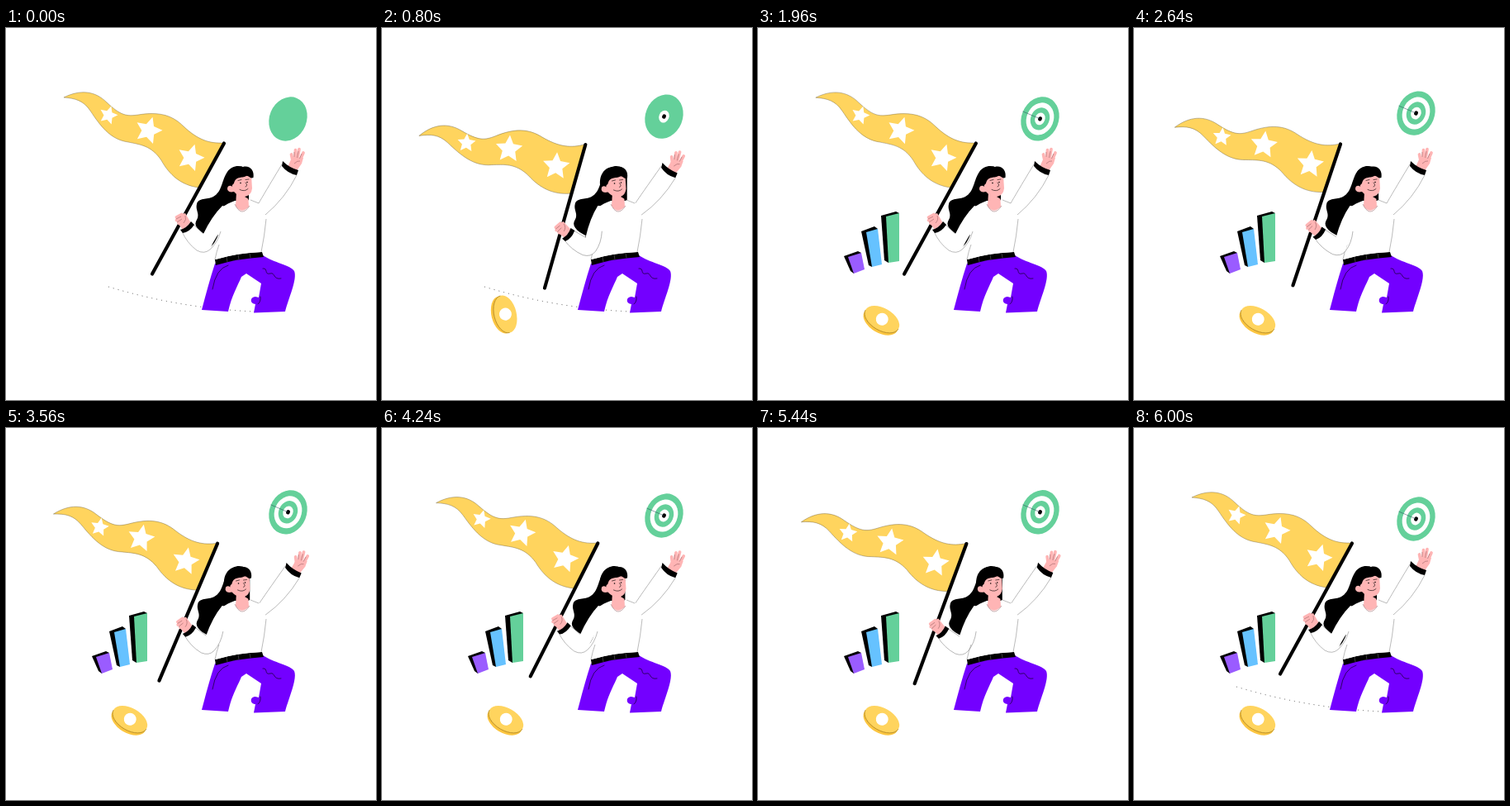
Animation of 448x450 px, one loop 6.04 s. Source, as an HTML page:

```html
<!DOCTYPE html>
<html lang="en">
<head>
<meta charset="utf-8">
<title>Flag bearer</title>
<style>
  html, body { margin: 0; width: 100%; height: 100%; overflow: hidden; background: #fff; }
  svg { display: block; width: 448px; height: 450px; }
  .thin { fill: none; stroke: #777; stroke-width: .5; }
  .ink { fill: none; stroke: #000; stroke-width: .6; stroke-linecap: round; }
  .skin { fill: #ffb5b5; }
  .fingers { fill: none; stroke: #ffb5b5; stroke-width: 3.7; stroke-linecap: round; }
  .crease { fill: none; stroke: #8a5558; stroke-width: .5; }
</style>
</head>
<body>
<svg viewBox="0 0 448 450">
  <path id="ground" d="M124 313Q210 339 300 343" fill="none" stroke="#333" stroke-width=".8" stroke-dasharray="1 5"/>

  <g id="bars"></g>

  <g id="coin">
    <ellipse cy="2" rx="23" ry="13.5" fill="#fbc540"/>
    <ellipse cy="-1.5" rx="23" ry="13.3" fill="#ffd45e"/>
    <path d="M-23 -1A23 13.3 0 0 0 23 -1" fill="none" stroke="#a98226" stroke-width=".7"/>
    <circle cy="-1.5" r="7.5" fill="#fff"/>
  </g>

  <g id="target">
    <g transform="rotate(22)">
      <ellipse rx="22.5" ry="27.3" fill="#64d09a"/>
      <ellipse class="ring" rx="16.3" ry="20" fill="#fff"/>
      <ellipse class="ring" rx="11.3" ry="14" fill="#64d09a"/>
      <ellipse class="ring" rx="6" ry="7.6" fill="#fff"/>
      <ellipse class="ring" rx="2.3" ry="2.7" fill="#000"/>
    </g>
    <path id="arrow" d="M0 0L-21 -9" fill="none" stroke="#245" stroke-width=".5" pathLength="1" stroke-dasharray="1"/>
  </g>

  <!-- hair -->
  <path id="hair" d="M294 176C290 165 275 164 268 174C261 184 262 198 251 204C243 208 233 205 231 213C229 221 236 225 230 234C227 241 236 248 250 254L266 220L280 214L294 208V190Z"/>
  <path d="M250 246L257 250Q254 259 247 266L244 256Z"/>

  <!-- trousers and belt -->
  <path d="M253 285L311 275C324 284 345 287 349 294C353 304 342 327 338 343L300 344.500L302 334C295 334 295 325 302 325L306 326L309 309L291 297L285 301C281 311 273 324 269 343L237 341C242 322 247 303 253 285Z" fill="#7300ff"/>
  <path d="M269 287Q254 291 250 316M311 291C318 290 312 299 320 297C326 295 323 305 333 303M305 334Q309 331 308 325" class="ink"/>
  <path d="M253 280Q280 272 310 271L312 277Q280 279 254 287Z"/>
  <path d="M267 277l1 6M281 274l1 6M295 272l1 6" class="thin"/>

  <!-- waving arm -->
  <g id="wave">
    <path d="M304 212L334 165L353 178L314 226L304 232Z" fill="#fff"/>
    <path d="M306 212Q311 203 334 165M352 178Q338 206 314 226" class="thin"/>
    <path d="M341 168L346 157L360 157L358 164L351 174Z" class="skin"/>
    <path d="M347 160L345.500 153M350 158L350.500 147.500M353 158L355 146.500M356 160L360 151" class="fingers"/>
    <path d="M349 156L349 150M352.500 157L354 149M355.500 158L358 152M349 164Q353 160 356 161" class="crease"/>
    <path d="M335 161Q343 169 354 172L352 178Q341 176 334 167Z"/>
  </g>

  <!-- torso -->
  <path d="M262 217Q268 212 277 209H296L306 212L315 228L309 271Q280 272 254 280L258 250Z" fill="#fff"/>
  <path d="M296 208L306 212M315 231Q313 252 309 271M258 262Q255 270 253 280" class="thin"/>

  <!-- head -->
  <path d="M279 199L278 215Q285 226 294 216L293 200Z" class="skin"/>
  <path d="M277 213Q285 230 295 215" class="crease"/>
  <path d="M289 204L294 199V207Z"/>
  <g id="head">
    <path d="M273 181L297 178L298 194Q297 202 291 203.500Q282 205 276 198Q267 200 268 192Q270 188 274 192Z" class="skin"/>
    <path d="M281 184.500l4 -1M290 183.500l4 -.5M290 187q3.500 4 0 5" class="ink"/>
    <path d="M283 195.500Q289 198.500 293 194.500" class="ink" stroke="#5a2730"/>
    <circle cx="284" cy="187.500" r=".8"/><circle cx="292" cy="186.500" r=".8"/>
    <path d="M267 192C264 176 274 165 287 168C295 166 301 172 299.500 181C295 183 294 178 291 179C285 182 278 179 276 188L273 191Q268 190 268 195Z"/>
  </g>

  <!-- flag arm -->
  <g id="flag">
    <path d="M70 84C90 74 108 76 122 90C139 106 146 107 160 105C185 101 201 105 215 119C232 135 246 140 264 139L233 193C212 190 198 178 188 160C176 142 162 141 148 138C126 135 114 118 102 100C94 88 84 85 70 84Z" fill="#ffd45e" stroke="#665a38" stroke-width=".4"/>
    <g id="stars" fill="#fff"></g>
    <path d="M264 139.500L177 297.500" stroke="#000" stroke-width="4.200" stroke-linecap="round"/>
    <path d="M226 237L239 249Q249 228 262 215L279 220L266 240Q254 250 247 268Q240 274 231 269Q219 260 213 246Z" fill="#fff"/>
    <path d="M213 246Q219 260 231 269Q240 274 247 268Q256 260 260 246M226 237L239 249" class="thin"/>
    <path d="M210 226L217 224L224 236L214 244L207 235Z" class="skin"/>
    <path d="M206.500 229L213 225.500M206.500 232.500L214 229M209 236L215 232.500" class="fingers"/>
    <path d="M206 231L212 228M207 235L213 231M217 227Q219 232 215 236" class="crease"/>
    <path d="M211 244Q219 242 224 234L228 238Q222 247 214 248Z"/>
  </g>
</svg>

<script>
const $ = id => document.getElementById(id);
const NS = 'http://www.w3.org/2000/svg';
const LOOP = 6040, TAU = 2 * Math.PI;

function add(parent, tag, attrs) {
  const el = parent.appendChild(document.createElementNS(NS, tag));
  for (const k in attrs) el.setAttribute(k, attrs[k]);
  return el;
}
const put = (el, transform) => el.setAttribute('transform', transform);
const clamp = x => Math.min(1, Math.max(0, x));
const smooth = x => (x = clamp(x), x * x * (3 - 2 * x));
const ramp = (t, from, to) => smooth((t - from) / (to - from));
const mix = (a, b, k) => a + (b - a) * k;

// centre x, centre y, radius
for (const [x, y, r] of [[124, 105.5, 11.5], [172.5, 124, 17], [223.5, 157, 17]]) {
  const pts = Array.from({ length: 10 }, (_, i) => {
    const a = i * TAU / 10 + .3, d = i % 2 ? r * .48 : r;
    return [x + d * Math.sin(a), y - d * Math.cos(a)];
  });
  add($('stars'), 'polygon', { points: pts.join(' ') });
}

// colour, base y, dark side, front
const bars = [
  ['#9a5cff', 297, '104,276 121,270 125,272 116,297 112,294', '109,277 125,272 129,292 116,297'],
  ['#66c2ff', 289, '125,246 141,240 145,243 138,289 134,287', '131,247 145,243 150,286 138,289'],
  ['#64d09a', 284, '149,227 167,222 171,224 158,284 153,281', '155,228 171,224 171,282 158,284']
].map(([fill, base, side, front]) => {
  const el = add($('bars'), 'g', {});
  add(el, 'polygon', { points: side });
  add(el, 'polygon', { points: front, fill });
  return { el, base };
});
const rings = [...document.querySelectorAll('.ring')];

function draw(t) {
  // flag swings about the shoulder, hair follows
  const swing = (1 - Math.cos(TAU * t / 2000)) / 2;
  put($('flag'), `rotate(${-14.3 * swing} 262 218)`);
  put($('hair'), `translate(${3 * swing} 0)`);

  // quick wave: a lean, then a wider flick
  const p = t * 9 / 6000 % 1;
  const lean = ramp(p, 0, .2) * (1 - ramp(p, .68, .92));
  const flick = p > .36 && p < .7 ? Math.sin(Math.PI * (p - .36) / .34) ** 2 : 0;
  put($('wave'), `rotate(${4.2 * lean + 8 * flick} 309 224)`);
  put($('head'), `translate(${-2.5 * lean} ${.5 * lean})`);

  put($('target'), `translate(341.5 ${105.75 + 4.25 * Math.cos(TAU * t / 1000)})`);
  rings.forEach((ring, i) => {
    const start = i < 2 ? 800 : 450;
    put(ring, `scale(${ramp(t, start, start + 350)})`);
  });
  const shot = ramp(t, 1300, 1600);
  $('arrow').setAttribute('stroke-dashoffset', 1 - shot);
  $('arrow').style.visibility = shot ? 'visible' : 'hidden';

  // coin rises, then tips over
  const rise = ramp(t, 100, 750), tip = ramp(t, 800, 1400);
  put($('coin'), `translate(${mix(148, 149.5, tip)} ${mix(mix(480, 346.5, rise), 353.5, tip)}) rotate(${mix(mix(200, 76, rise), 30, tip)})`);

  bars.forEach(({ el, base }, i) => {
    const grow = ramp(t, 1000 + i * 150, 1450 + i * 150);
    put(el, `translate(0 ${base * (1 - grow)}) scale(1 ${grow})`);
    el.style.visibility = grow ? 'visible' : 'hidden';
  });
  $('ground').style.visibility = t < 1000 || t > 5900 ? 'visible' : 'hidden';
}

const start = performance.now();
function tick() {
  draw((performance.now() - start) % LOOP);
  requestAnimationFrame(tick);
}
tick();
</script>
</body>
</html>
```
